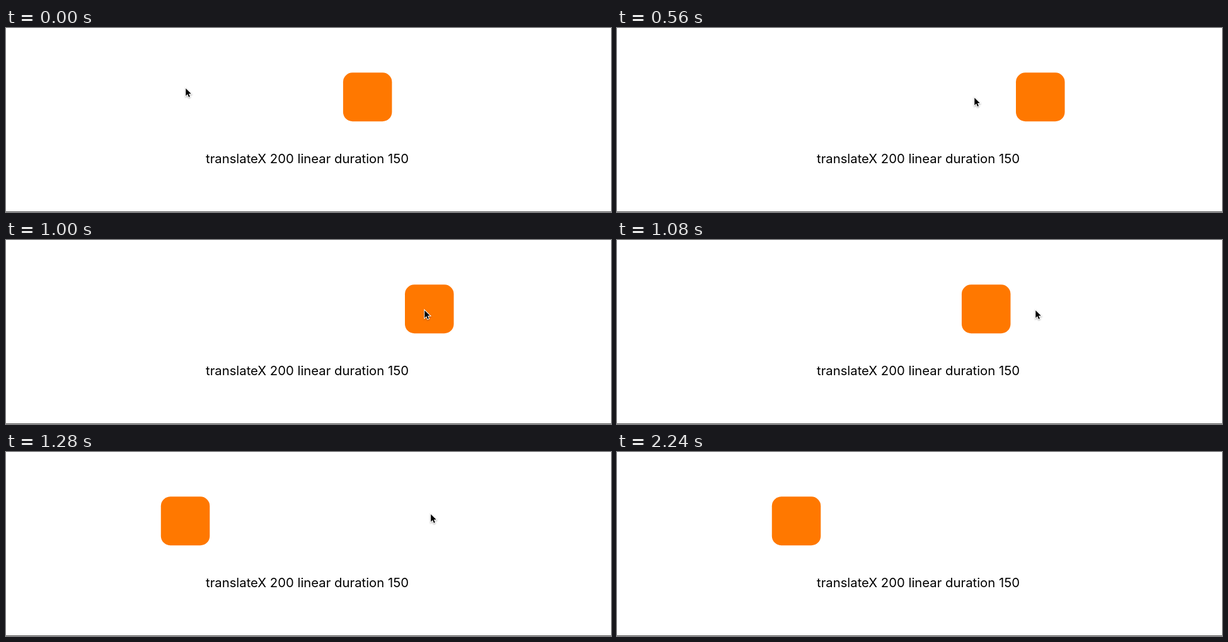
An HTML page that plays this animation: 960x294 px, repeating every 2280 ms.

```html
<!DOCTYPE html>
<html lang="en">
<head>
<meta charset="utf-8">
<title>translateX</title>
<style>
  html, body { margin: 0; width: 100%; height: 100%; overflow: hidden; background: #fff; }
  svg { display: block; width: 960px; height: 294px; }
  text { font: 400 20.3px Inter, "Open Sans", sans-serif; text-anchor: middle; }
  #cursor { filter: drop-shadow(0 1px 1px rgba(0, 0, 0, .35)); }
</style>
</head>
<body>
<svg viewBox="0 0 960 294">
  <rect id="box" y="71.3" width="77.5" height="77.9" rx="15" fill="#ff7800"/>
  <text x="478" y="216">translateX 200 linear duration 150</text>
  <rect y="293" width="960" height="1" fill="#555"/>
  <path id="cursor" d="M0 0V12L2.8 9.4L4.8 14L6.6 13.2L4.7 8.7H8.5Z"
        fill="#000" stroke="#fff" stroke-width="2" paint-order="stroke"/>
</svg>
<script>
const LOOP = 2280, STEP = 40;
const LEFT = 245.8, RANGE = 387.2, SLIDE = 180;

const box = document.getElementById("box");
const cursor = document.getElementById("cursor");

// Progress from 0 to 1 between two times
const span = (t, from, to) => Math.min(1, Math.max(0, (t - from) / (to - from)));
const easeOut = u => 1 - (1 - u) ** 2;
const slide = (t, from) => span(t, from, from + SLIDE);

function boxX(t) {
  return LEFT + RANGE * (slide(t, -134.4) - slide(t, 1040));
}

function cursorAt(t) {
  const away = easeOut(span(t, 400, 720)) - easeOut(span(t, 1600, 1960));
  const drift = span(t, 840, 960);
  const hop = Math.sin(Math.PI * span(t, 1240, 1640));
  return [
    285.3 + 376 * away + 3 * drift + 32 * hop,
    96.4 + 20 * away - 4 * drift - 42 * hop
  ];
}

function draw(time) {
  const t = Math.floor((time % LOOP) / STEP) * STEP;
  box.setAttribute("x", boxX(t));
  cursor.setAttribute("transform", `translate(${cursorAt(t)})`);
  cursor.style.visibility = t < 2000 ? "visible" : "hidden";
}

const start = performance.now();
function tick() {
  draw(performance.now() - start);
  requestAnimationFrame(tick);
}
tick();
</script>
</body>
</html>
```
